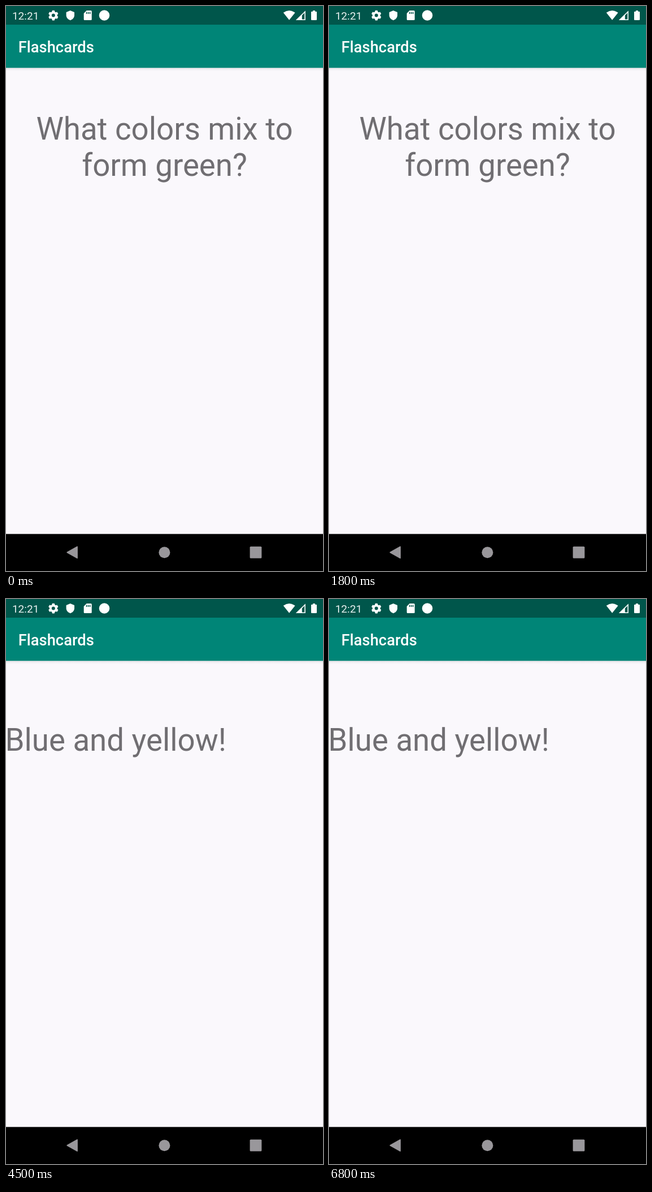
These frames come from a looping animation (561 px wide and 998 px high, 6.9 s). An HTML page:

```html
<!DOCTYPE html>
<html lang="en">
<head>
<meta charset="utf-8">
<title>Flashcards</title>
<style>
  html, body { margin: 0; width: 100%; height: 100%; overflow: hidden; background: #faf8fc; }
  svg { display: block; width: 100%; height: 100%; font-family: Roboto, sans-serif; }
  .card { font-size: 54.6px; fill: #706e72; }
</style>
</head>
<body>
<svg viewBox="0 0 561 998">
  <defs>
    <linearGradient id="shade" x2="0" y2="1">
      <stop stop-color="#dcdade"/>
      <stop offset=".4" stop-color="#f0eef2"/>
      <stop offset="1" stop-color="#faf8fc"/>
    </linearGradient>
  </defs>
  <rect width="561" height="998" fill="#faf8fc"/>
  <rect y="109" width="561" height="6" fill="url(#shade)"/>
  <rect y="32" width="561" height="77.2" fill="#008577"/>
  <rect width="561" height="33" fill="#00564b"/>
  <rect y="932.6" width="561" height="65.4"/>

  <g fill="#fff">
    <text x="10.9" y="24" font-size="19.1" fill="#e9f1f0">12:21</text>
    <text x="21.8" y="81.5" font-size="27.3" font-weight="500">Flashcards</text>
    <g id="gear" transform="translate(83.8 16.6)">
      <circle r="4.9" fill="none" stroke="#fff" stroke-width="3.8"/>
    </g>
    <path d="M113.8 8l7.2 3.1v5.2c0 4.3-3 7.6-7.2 8.9c-4.2-1.3-7.2-4.6-7.2-8.9v-5.2z"/>
    <path d="M142.6 8h7.6q1.5 0 1.5 1.5v14q0 1.5-1.5 1.5h-11q-1.5 0-1.5-1.5v-10.6z"/>
    <path d="M142.6 10.5v3.6m3-3.6v3.6m3-3.6v3.6" stroke="#00564b" stroke-width="1.6"/>
    <circle cx="174" cy="16.5" r="9.3"/>
    <path d="M490.8 11.7q10.4-7.2 20.8 0l-10.4 13z"/>
    <path d="M514.9 24.3h14.2v-14.2z" fill="none" stroke="#fff" stroke-width="1.6"/>
    <path d="M513.2 25h10.6v-10.4z"/>
    <path d="M543 8h4v1.8h1.8q1.2 0 1.2 1.2v12.8q0 1.2-1.2 1.2h-7.6q-1.2 0-1.2-1.2v-12.8q0-1.2 1.2-1.2h1.8z"/>
  </g>

  <g fill="#99979b">
    <path d="M108 964.2L125.4 954.4q1.5-.8 1.5.9v19.6q0 1.7-1.5.9L108 966q-1.6-.9 0-1.8z"/>
    <circle cx="280.4" cy="965.2" r="10"/>
    <rect x="431.6" y="954.8" width="20.8" height="20.8" rx="1.5"/>
  </g>

  <g id="question" class="card" text-anchor="middle">
    <text x="280.5" y="235.5">What colors mix to</text>
    <text x="280.5" y="299.5">form green?</text>
  </g>
  <text id="answer" class="card" x="-1.5" y="267.5">Blue and yellow!</text>
</svg>
<script>
  const LOOP = 6900;
  const FLIPS = [3900, 4700, 5500];
  const byId = id => document.getElementById(id);
  const question = byId('question'), answer = byId('answer');

  // six gear teeth
  for (let a = 0; a < 360; a += 60) {
    const tooth = document.createElementNS('http://www.w3.org/2000/svg', 'path');
    tooth.setAttribute('d', 'M-2.9-5.5L-1.9-8.8H1.9L2.9-5.5z');
    tooth.setAttribute('transform', `rotate(${a})`);
    byId('gear').append(tooth);
  }

  function draw(t) {
    const flipped = FLIPS.filter(f => t >= f).length % 2 === 1;
    question.style.display = flipped ? 'none' : '';
    answer.style.display = flipped ? '' : 'none';
  }

  const start = performance.now();
  function tick() {
    draw((performance.now() - start) % LOOP);
    requestAnimationFrame(tick);
  }
  draw(0);
  tick();
</script>
</body>
</html>
```
